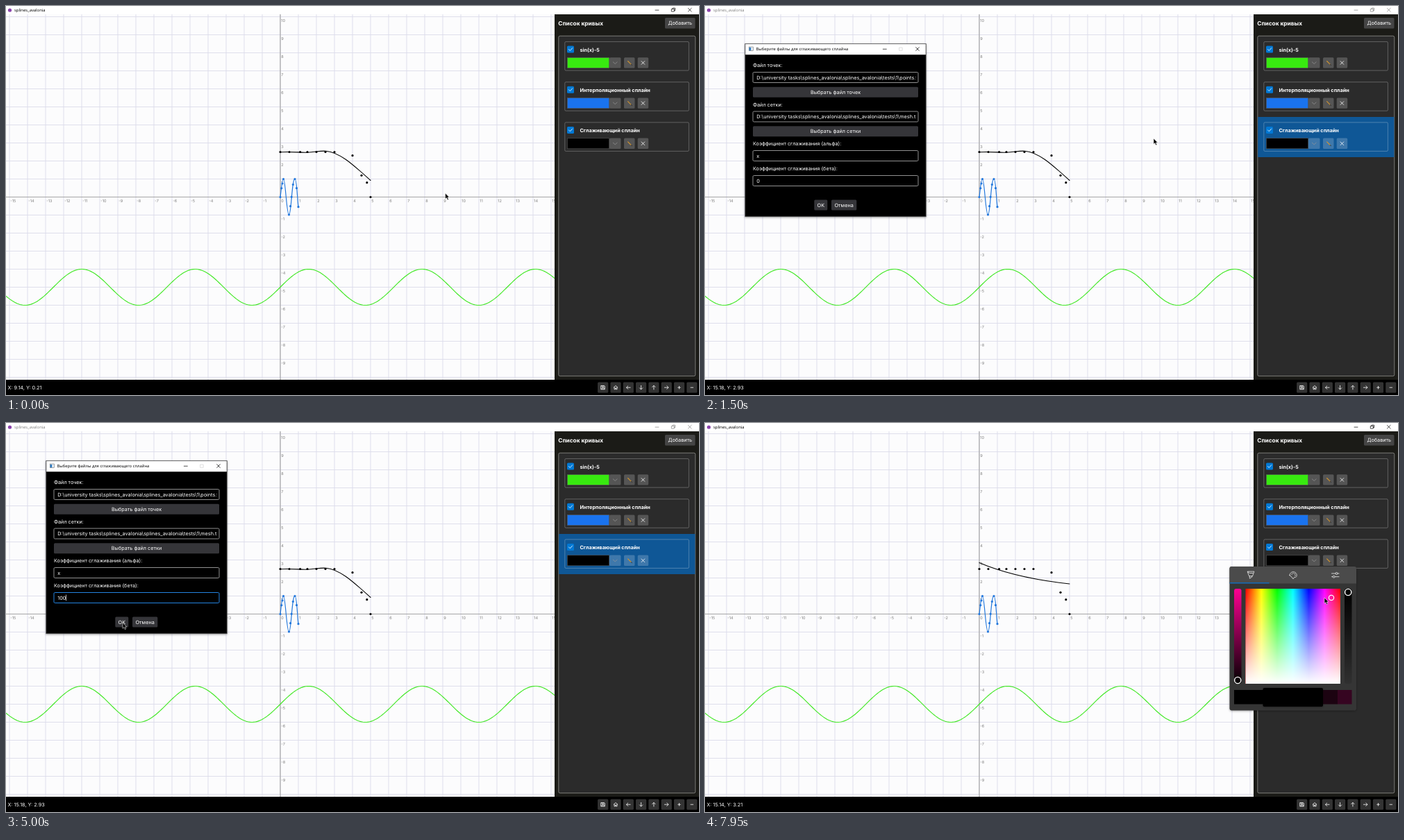
Write an HTML page that moves like this. It is 998 px wide and 561 px high and loops after 8 s.

```html
<!DOCTYPE html>
<html lang="ru">
<head>
<meta charset="utf-8">
<title>splines_avalonia</title>
<style>
html, body { margin: 0; width: 100%; height: 100%; overflow: hidden; background: #000; }
svg { display: block; width: 100%; height: 100%; }
text { font-family: Inter, sans-serif; white-space: pre; text-rendering: geometricPrecision; }
.win { font-family: "Open Sans", sans-serif; }
.line { fill: none; stroke-linecap: round; stroke-linejoin: round; }
</style>
</head>
<body>
<svg id="stage" viewBox="0 0 998 561" preserveAspectRatio="none"></svg>
<script>
const LOOP = 8000, STEP = 50, UNIT = 26, OX = 395, OY = 275.5;
const px = x => OX + x * UNIT;
const py = y => OY - y * UNIT;
const range = (a, b) => Array.from({ length: b - a + 1 }, (_, i) => a + i);

const rect = (x, y, w, h, fill, extra = '') =>
  `<rect x="${x}" y="${y}" width="${w}" height="${h}" fill="${fill}" ${extra}/>`;
const text = (x, y, s, size = 7.28, fill = '#fff', extra = '') =>
  `<text x="${x}" y="${y}" font-size="${size}" fill="${fill}" ${extra}>${s}</text>`;
const line = (d, color = '#fff', w = 0.8, extra = '') =>
  `<path class="line" d="${d}" stroke="${color}" stroke-width="${w}" ${extra}/>`;
const dot = (x, y, r, fill, extra = '') =>
  `<circle cx="${x}" cy="${y}" r="${r}" fill="${fill}" ${extra}/>`;
const cross = (x, y, r, color, w) =>
  line(`M${x - r} ${y - r}l${2 * r} ${2 * r}m0 ${-2 * r}l${-2 * r} ${2 * r}`, color, w);
const group = (id, body) => `<g id="${id}">${body}</g>`;
const stops = list => list.map(([o, c, a = 1]) =>
  `<stop offset="${o}" stop-color="${c}" stop-opacity="${a}"/>`).join('');

function defs() {
  const hues = range(0, 6).map(i => [i / 6, `hsl(${i * 60},100%,50%)`]);
  const down = 'x1="0" y1="0" x2="0" y2="1"';
  return `<defs>
    <linearGradient id="hue">${stops(hues)}</linearGradient>
    <linearGradient id="white" ${down}>${stops([[0, '#fff', 0], [1, '#fff']])}</linearGradient>
    <linearGradient id="value" ${down}><stop id="pure" offset="0"/>${stops([[1, '#000']])}</linearGradient>
    <linearGradient id="alpha" ${down}>${stops([[0, '#000'], [1, '#000', 0.1]])}</linearGradient>
    <filter id="shadow" x="-10%" y="-10%" width="120%" height="125%">
      <feDropShadow dx="0" dy="1" stdDeviation="1.6" flood-opacity=".35"/></filter>
    <clipPath id="plotClip"><rect y="12" width="790" height="527"/></clipPath>
    <clipPath id="fieldClip"><rect x="70" y="90" width="234" height="80"/></clipPath>
    <clipPath id="spectrumClip"><rect x="778.5" y="239" width="136.5" height="137"/></clipPath>
  </defs>`;
}

function plot() {
  const cols = range(-15, 15), rows = range(-10, 10);
  const label = (x, y, s) => text(x, y, s, 5.6, '#808080');
  const grid = cols.map(i => `M${px(i)} 12V539`).join('') + rows.map(i => `M0 ${py(i)}H790`).join('');
  const sine = range(0, 395).map(i => {
    const x = i * 2;
    return `${i ? 'L' : 'M'}${x} ${py(Math.sin((x - OX) / UNIT) - 5).toFixed(2)}`;
  }).join('');
  const wave = 'M395 275.5C396.5 264 397.5 249.5 399.5 249.5C402.5 249.5 404 301 407.5 301' +
    'C411 301 411.5 249.5 416 249.5C419 249.5 419.5 280 421 289.7';
  const wavePoints = [[395, 275.5], [396.8, 262.8], [398, 256], [399.5, 249.5], [407.5, 301],
    [409.6, 288.7], [411.2, 275.3], [413.4, 257.5], [416, 249.5], [418.5, 262.7], [421, 289.7]];
  const data = [[0, 2.5], [.5, 2.5], [1.1, 2.5], [1.5, 2.5], [2, 2.5], [2.5, 2.5], [3, 2.5],
    [4, 2.3], [4.5, 1.2], [4.8, .8], [5, 0]];
  return `<g clip-path="url(#plotClip)">` +
    rect(0, 12, 790, 527, '#fcfcfd') + line(grid, '#dcdcea', 0.9) +
    line(`M0 ${OY}H790M${OX} 12V539`, '#a6a6a6', 1.2) +
    cols.map(i => label(px(i) + 1.2, OY + 7, i)).join('') +
    rows.filter(i => i).map(i => label(OX + 1.2, py(i) + 7, i)).join('') +
    line(sine, '#42e826', 1.15) +
    line(wave, '#2277dc', 1.2) + wavePoints.map(p => dot(...p, 1.6, '#2277dc')).join('') +
    line('', '#000', 1.1, 'id="smooth"') +
    data.map(([x, y]) => dot(px(x), py(y), 1.6, '#000')).join('') + '</g>';
}

function titleBar() {
  return rect(0, 0, 998, 12, '#fff') + dot(5.5, 6, 2.6, '#8b44ac') +
    group('title', text(12, 8.2, 'splines_avalonia', 5.87, '#000', 'class="win"') +
      line('M935 6h5M958.7 4.3h3.6v3.6h-3.6zM960 4.3v-1.3h3.6v3.6h-1.3', '#000', 0.7) +
      cross(984.8, 5.6, 2.4, '#000', 0.7));
}

function card(y, name, color) {
  const button = (x, w) => rect(x, y + 22.7, w, 15.3, '#fff', 'fill-opacity=".2" rx="1.5"');
  return rect(804.8, y, 178.6, 41.5, 'none', 'stroke="#fff" stroke-opacity=".36" stroke-width=".7" rx="1.5"') +
    rect(808, y + 6, 10, 10, '#0078d4', 'rx="1.5"') +
    line(`M810.5 ${y + 11}l1.8 1.9 3.4-3.8`) +
    text(826.5, y + 14, name, 7.28, '#fff', 'font-weight="700"') +
    button(869, 16.5) + button(890, 15.5) + button(909.7, 15.5) +
    rect(808.3, y + 22.9, 60.4, 15, color, 'stroke="#555" stroke-width=".6"') +
    line(`M874.3 ${y + 29.3}l2.9 2.6 2.9-2.6`, '#999', 0.7) +
    line(`M895.6 ${y + 28}l4.6 4.6`, '#d0942f', 1.1) + line(`M900.2 ${y + 32.6}l1.2 1.2`, '#222', 0.9) +
    cross(917.4, y + 30.4, 2.3, '#fff', 0.8);
}

function sidePanel() {
  return rect(790, 12, 208, 527, '#1b1b17') +
    text(795.3, 27.9, 'Список кривых', 8.32, '#fff', 'font-weight="700"') +
    rect(949, 17, 43.5, 15.5, '#454545', 'rx="1.5"') + text(953.5, 27.4, 'Добавить') +
    rect(795.8, 43.2, 197, 490.5, '#2b2b2b', 'stroke="#92928e" stroke-width=".8" rx="2"') +
    rect(796.2, 160, 196.2, 58, '#3e3e41', 'id="row"') +
    card(51.5, 'sin(x)-5', '#38ea10') +
    card(109.7, 'Интерполяционный сплайн', '#1a73ee') +
    card(167.9, 'Сглаживающий сплайн', '#000');
}

function statusBar() {
  const icons = ['M-2.6-2.6h4.4l.8.8v4.4h-5.2zM-1.3-2.4v1.6h2.4v-1.6M-1.4 2.4v-1.8h2.8v1.8',
    'M-2.8 0L0-2.7 2.8 0M-2-.6v3.2h1.4v-1.8h1.2v1.8h1.4v-3.2',
    'M2.8 0h-5.6l2.2-2.2m-2.2 2.2l2.2 2.2', 'M0-2.8v5.6l-2.2-2.2m2.2 2.2l2.2-2.2',
    'M0 2.8v-5.6l-2.2 2.2m2.2-2.2l2.2 2.2', 'M-2.8 0h5.6l-2.2-2.2m2.2 2.2l-2.2 2.2',
    'M-1.8 0h3.6M0-1.8v3.6', 'M-1.8 0h3.6'];
  return rect(0, 539, 998, 22, '#000') + text(2.5, 553, '', 7.28, '#fff', 'id="status"') +
    icons.map((d, i) => `<g transform="translate(${859.7 + i * 18.3} 550.2)">` +
      rect(-7.6, -7.6, 15.2, 15.2, '#333', 'rx="1.5"') + line(d) + '</g>').join('');
}

function dialog() {
  const path = 'D:\\university tasks\\splines_avalonia\\splines_avalonia\\tests\\1\\';
  const box = (y, extra = 'stroke="#909090"') =>
    rect(69, y, 238, 15, '#000', `stroke-width="1" rx="1.5" ${extra}`);
  const field = (y, value) =>
    box(y) + text(74.2, y + 10, value, 7.28, '#fff', 'clip-path="url(#fieldClip)"');
  const button = (x, y, w, s) => rect(x, y, w, 15, '#353539', 'rx="1.5"') +
    text(x + w / 2, y + 10.1, s, 7.28, '#fff', 'text-anchor="middle"');
  return rect(57.8, 54.5, 260.4, 249.3, '#000', 'stroke="#555" stroke-width=".8" filter="url(#shadow)"') +
    rect(58.2, 54.9, 259.6, 15.3, '#fff') +
    rect(63.2, 59, 6.4, 5.6, '#e8eef4', 'stroke="#555" stroke-width=".5"') + rect(63.6, 59.8, 2.6, 4.4, '#2a78c0') +
    text(73.5, 64.4, 'Выберите файлы для сглаживающего сплайна', 5.87, '#000', 'class="win"') +
    line('M256.3 62.2h5', '#000', 0.7) + line('M280 60h4.2v4.2h-4.2z', '#ccc', 0.6) +
    cross(306, 62, 2.4, '#000', 0.7) +
    text(69, 88, 'Файл точек:') + field(95.5, path + 'points.txt') + button(69, 116.8, 238, 'Выбрать файл точек') +
    text(69, 144.6, 'Файл сетки:') + field(152, path + 'mesh.txt') + button(69, 173.3, 238, 'Выбрать файл сетки') +
    text(69, 201, 'Коэффициент сглаживания (альфа):') + field(208.5, '') + text(74.2, 218.6, 'x') +
    text(69, 237, 'Коэффициент сглаживания (бета):') + box(244.5, 'id="betaBox"') +
    text(74.2, 254.6, '0', 7.28, '#fff', 'id="beta"') + line('', '#fff', 0.7, 'id="caret"') +
    button(157.3, 279.6, 19, 'OK') + button(182, 279.6, 36.3, 'Отмена');
}

function picker() {
  const ring = (x, y, r, color, w, extra = '') => dot(x, y, r, 'none', `stroke="${color}" stroke-width="${w}" ${extra}`);
  const brush = 'M781.3 214.5l2.2 6.3h5l2.2-6.3zM781.3 214.5l3 2h4.8M784.3 220.8v3.4l3.4-2v-1.4';
  const palette = 'M842 219.5c0-3 3-5.3 6-4.7c3.5.6 5 4 3.7 6.7c-1 2-2 0-3.2 1' +
    'c-1 1 0 2-1.5 2c-1.6 0-1.5-2.5-2.7-3.2c-1-.5-2.3-.3-2.3-1.8z';
  const sliders = 'M902.5 217h5.5m3 0h2M902.5 221.7h1.5m3.2 0h5.8';
  return rect(755.5, 207, 182.5, 207.5, '#343434', 'rx="3" filter="url(#shadow)"') +
    '<path d="M755.5 231.5V210a3 3 0 0 1 3-3h176.5a3 3 0 0 1 3 3v21.5z" fill="#4b4b4b"/>' +
    rect(755.5, 230, 57, 1.4, '#0f6cbd') +
    line(brush + palette + sliders, '#ddd', 0.9) +
    [[845, 218], [847, 216.8], [849.4, 217.5], [850, 219.8]].map(p => dot(...p, 0.7, '#ddd')).join('') +
    ring(909.5, 217, 1.5, '#ddd', 0.9) + ring(905.6, 221.7, 1.5, '#ddd', 0.9) +
    rect(762, 239, 10.5, 137, 'url(#value)', 'rx="3"') +
    rect(778.5, 239, 136.5, 137, 'url(#hue)') + rect(778.5, 239, 136.5, 137, 'url(#white)') +
    rect(921, 239, 10.5, 137, 'url(#alpha)', 'rx="3"') +
    ring(767.2, 371, 4.6, '#fff', 1.4) + ring(926.2, 244, 4.6, '#fff', 1.4) +
    `<g clip-path="url(#spectrumClip)">${ring(0, 0, 3.6, '#fff', 1.2, 'id="marker"')}</g>` +
    rect(762, 385, 45, 20.5, '#000') +
    rect(888, 385, 23, 20.5, '', 'id="tint1"') + rect(911, 385, 20.5, 20.5, '', 'id="tint2"') +
    rect(803.5, 382, 86.5, 27, '#000', 'rx="2" filter="url(#shadow)"');
}

const pointer = '<path id="arrow" d="M0 0V8.3L1.9 6.6 3.3 9.7 4.8 9 3.4 6H5.9z" fill="#000" stroke="#fff" stroke-width=".55"/>' +
  line('M-1.4-3.8h1l.4.4.4-.4h1M0-3.4v6.8M-1.4 3.8h1l.4-.4.4.4h1', '#fff', 0.8, 'id="ibeam"');

const stage = document.getElementById('stage');
stage.innerHTML = defs() + plot() + titleBar() + sidePanel() + statusBar() +
  group('dialog', dialog()) + group('picker', picker()) + group('cursor', pointer);
const el = Object.fromEntries([...stage.querySelectorAll('[id]')].map(e => [e.id, e]));

// Moments of the session, ms
const T = { exit: 650, select: 1100, open: 1300, focus: 2300, close: 5100, exitAgain: 6050, popup: 6400, drag: 7350 };
const LAG = 100; // the app redraws this much behind the pointer
const path = [[0, 632.6, 270], [150, 632.6, 270], [T.exit, 789.7, 199.3], [900, 882, 205], [1000, 898, 198],
  [1150, 898, 198], [1500, 646, 191], [2150, 124.5, 252], [4200, 124.5, 252], [4800, 168, 288],
  [5200, 168, 288], [5350, 231.2, 290.3], [5450, 307, 291], [T.exitAgain, 788.6, 192], [6300, 877, 198],
  [6400, 877, 198], [6600, 854, 209], [T.drag, 910, 256], [7850, 902, 252], [7950, 892, 252]];
const typing = [[0, '0'], [2900, ''], [3200, '1'], [3400, '10'], [3600, '100']];
const before = 'M395 210.8C410 209.5 425 211.8 434 211.2C446 210.4 453 208.6 461 209.2C481 211 500 229 525 251.5';
const after = 'M395 201.5C430 216.5 470 226 525 232';

// Monotone cubic through the waypoints: smooth in motion, still at the holds.
const slope = (i, axis) => path[i] && path[i + 1]
  ? (path[i + 1][axis] - path[i][axis]) / (path[i + 1][0] - path[i][0]) : 0;
function velocity(i, axis) {
  const a = slope(i - 1, axis), b = slope(i, axis);
  return a * b > 0 ? 2 * a * b / (a + b) : 0;
}
function position(t) {
  const next = path.findIndex(p => p[0] > t);
  if (next < 0) return path[path.length - 1].slice(1);
  const i = next - 1, span = path[next][0] - path[i][0], k = (t - path[i][0]) / span;
  const ease = k * k * (3 - 2 * k);
  return [1, 2].map(axis => path[i][axis] * (1 - ease) + path[next][axis] * ease +
    span * k * (1 - k) * ((1 - k) * velocity(i, axis) - k * velocity(next, axis)));
}

// The coordinate readout freezes while the pointer is off the plot.
function readoutTime(t) {
  if (t < T.close) return Math.min(t, T.exit);
  return t < T.exitAgain ? Math.max(t - LAG, T.close) : T.exitAgain;
}

const show = (e, on) => e.setAttribute('visibility', on ? 'visible' : 'hidden');
const set = (e, attrs) => Object.entries(attrs).forEach(([k, v]) => e.setAttribute(k, v));

function render(t) {
  const [x, y] = position(t);
  const modal = t >= T.open && t < T.close;
  const selected = t >= T.select && t < T.close;
  const focused = t >= T.focus && modal;
  const popup = t >= T.popup;

  const overField = modal && x > 69 && x < 307 && Math.abs(y - 252) < 8;
  set(el.cursor, { transform: `translate(${x} ${y})` });
  show(el.arrow, !overField);
  show(el.ibeam, overField);

  const [sx, sy] = position(readoutTime(t));
  el.status.textContent = `X: ${+((sx - OX) / UNIT).toFixed(2)}, Y: ${+((OY - sy) / UNIT).toFixed(2)}`;

  const hovered = !popup && x > 796 && y > 160 && y < 218;
  show(el.row, selected || hovered);
  set(el.row, { fill: selected ? '#0f5796' : '#3e3e41' });
  set(el.title, { opacity: modal ? 0.5 : 1 });
  set(el.smooth, { d: t < T.close ? before : after });

  show(el.dialog, modal);
  const value = typing.filter(([at]) => at <= t).pop()[1];
  el.beta.textContent = value;
  set(el.betaBox, { stroke: focused ? '#2483e0' : '#909090' });
  const end = 74.4 + (value ? el.beta.getComputedTextLength() : 0);
  set(el.caret, { d: focused ? `M${end} 248v8` : '' });

  show(el.picker, popup);
  const [mx, my] = t >= T.drag ? position(Math.max(t - LAG, T.drag)) : [778.5, 376];
  const hue = (mx - 778.5) / 136.5 * 360, sat = (376 - my) / 137;
  const shade = v => `hsl(${hue},${100 * sat / (2 - sat)}%,${100 * v * (1 - sat / 2)}%)`;
  set(el.marker, { cx: mx, cy: my });
  set(el.pure, { 'stop-color': `hsl(${hue},100%,50%)` });
  set(el.tint1, { fill: shade(0.11) });
  set(el.tint2, { fill: shade(0.21) });
}

const start = performance.now();
function tick() {
  const t = (performance.now() - start) % LOOP;
  render(Math.floor(t / STEP) * STEP);
  requestAnimationFrame(tick);
}
tick();
</script>
</body>
</html>
```
